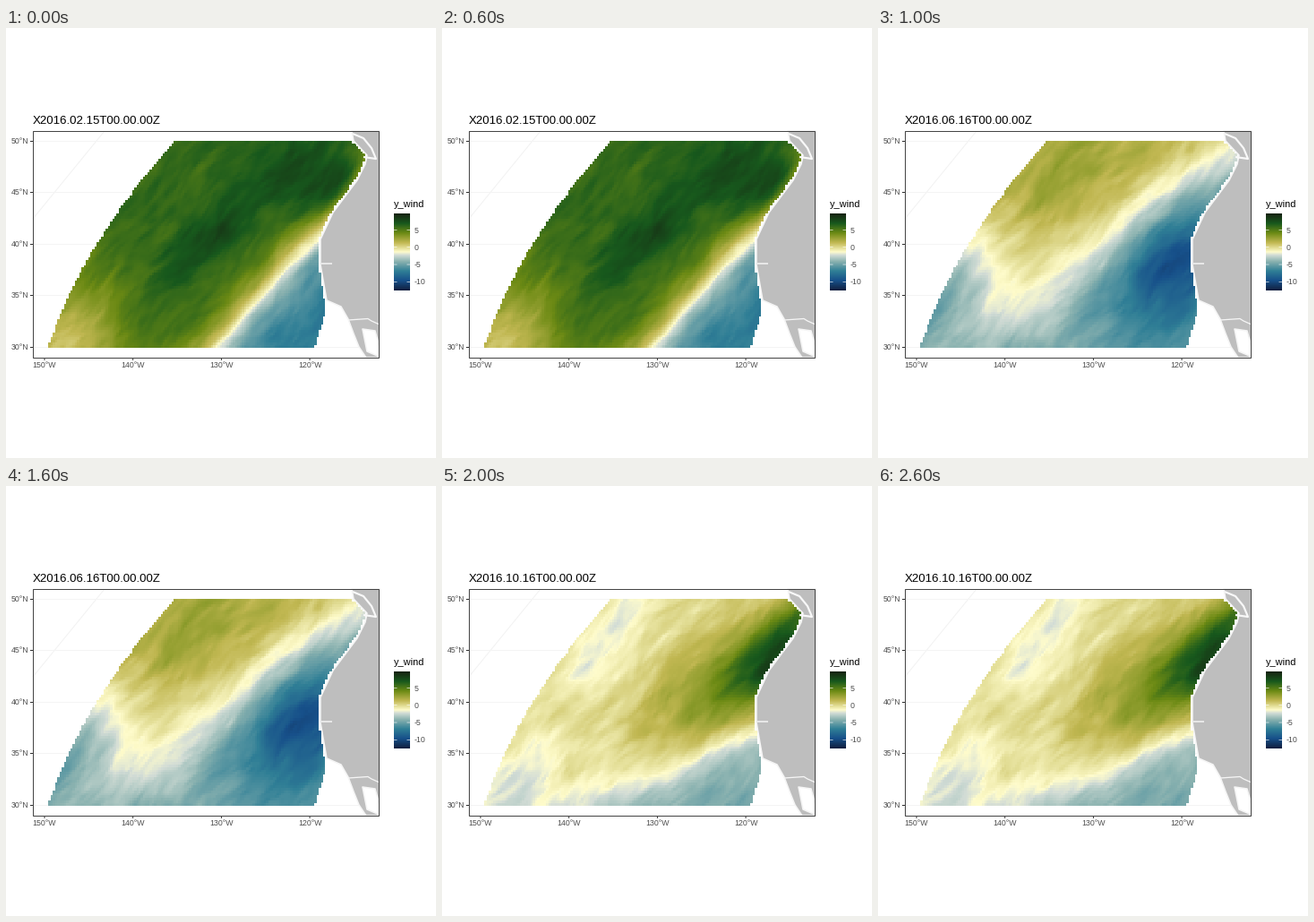
Animation of 480 by 480 pixels, one loop 3000 ms. Source, as a matplotlib script:

```python
import numpy as np
import matplotlib.pyplot as plt
from matplotlib.animation import FuncAnimation
from matplotlib.colors import LinearSegmentedColormap
from matplotlib.patches import Polygon, Rectangle

SIZE, DPI = 480, 96
PT = 72 / DPI
TOP, BOTTOM = 126, 357
WEST, EAST = 45, 403
ROWS, COLS = 80, 146
STREAK_ANGLE = np.radians(47)

plt.rcParams["font.family"] = "Liberation Sans"

DELTA = LinearSegmentedColormap.from_list("delta", [
    (0, "#112040"), (.125, "#17508a"), (.25, "#307f96"), (.375, "#8ab2b0"),
    (.46, "#d3ddd6"), (.5, "#fffccc"), (.625, "#c0b751"), (.75, "#6c8a14"),
    (.875, "#18591d"), (1, "#172313")], N=512)

# Each month: base level, one front (direction, offset, softness, drop)
# and swells (x, y, height, length, width) stretched along the streaks
MONTHS = [
    dict(title="X2016.02.15T00.00.00Z", base=.83,
         front=((.758, .652), 408, 13, .58),
         swells=[(220, 240, .08, 85, 28), (330, 155, .06, 80, 40),
                 (62, 350, -.2, 80, 75), (375, 185, .2, 50, 30)]),
    dict(title="X2016.06.16T00.00.00Z", base=.67,
         front=((.584, .812), 340, 22, .36),
         swells=[(330, 262, -.2, 70, 50), (55, 310, -.3, 110, 55),
                 (180, 320, .07, 50, 45), (190, 185, .05, 45, 18)]),
    dict(title="X2016.10.16T00.00.00Z", base=.55,
         front=((.4, .917), 395, 14, .2),
         swells=[(378, 185, .32, 85, 34), (300, 220, .13, 110, 50),
                 (180, 172, -.09, 65, 22), (85, 335, -.08, 50, 40)]),
]

# Coast from north to south
COAST = [(388, 126), (403, 142), (401, 152), (392, 170), (365, 206),
         (351, 236), (351, 264), (358, 304)]
PENINSULA = [(374, 311), (382, 325), (388, 341), (394, 356), (402, 368)]
GULF = [(398, 336), (412, 338), (417, 356), (417, 367), (403, 361)]


def along_across(x, y):
    c, s = np.cos(STREAK_ANGLE), np.sin(STREAK_ANGLE)
    return x * c - y * s, x * s + y * c


def wind_level(month, x, y):
    (nx, ny), offset, softness, drop = month["front"]
    side = (nx * x + ny * y - offset) / softness
    level = month["base"] - drop / (1 + np.exp(-side))
    for cx, cy, height, length, width in month["swells"]:
        a, b = along_across(x - cx, y - cy)
        level += height * np.exp(-(a / length) ** 2 - (b / width) ** 2)
    return level


def value_noise(rng, a, b):
    grid = rng.uniform(-1, 1, (128, 128))
    i, j = np.floor(a).astype(int), np.floor(b).astype(int)
    fa, fb = a - i, b - j
    fa, fb = fa * fa * (3 - 2 * fa), fb * fb * (3 - 2 * fb)

    def at(p, q):
        return grid[(i + p) % 128, (j + q) % 128]

    return ((at(0, 0) * (1 - fa) + at(1, 0) * fa) * (1 - fb)
            + (at(0, 1) * (1 - fa) + at(1, 1) * fa) * fb)


def streaks(rng, x, y):
    a, b = along_across(x, y)
    b = b + 4 * np.sin(a / 23)
    return sum(.024 * .75 ** k * value_noise(rng, a * 2 ** k / 46,
                                             b * 2 ** k / 15)
               for k in range(3))


def ocean_mask(x, y):
    v = (y - TOP) / (BOTTOM - TOP)
    west = 188 - 206 * v + 65 * v ** 2
    coast_x, coast_y = zip(*COAST)
    shore = np.interp(y, coast_y, coast_x) - 2.5
    offshore = 359 - (y - 312) / 3
    return (x >= west) & (x <= np.minimum(shore, offshore))


def wind_image(month, seed):
    x = WEST + (np.arange(COLS) + .5) * (EAST - WEST) / COLS
    y = TOP + (np.arange(ROWS) + .5) * (BOTTOM - TOP) / ROWS
    x, y = np.meshgrid(x, y)
    level = wind_level(month, x, y) + streaks(np.random.default_rng(seed), x, y)
    rgba = DELTA(np.clip(level, 0, 1))
    rgba[..., 3] = ocean_mask(x, y)
    return rgba


fig = plt.figure(figsize=(SIZE / DPI, SIZE / DPI), dpi=DPI, facecolor="white")
ax = fig.add_axes([0, 0, 1, 1])
ax.axis("off")


def line(points, color, width=1, z=1):
    ax.plot(*zip(*points), color=color, lw=width * PT, zorder=z,
            solid_capstyle="butt", snap=False)


def label(x, y, text, size=8.8, color="#4d4d4d", ha="left"):
    return ax.text(x, y, text, fontsize=size * PT, color=color, ha=ha,
                   va="baseline")


def shape(points, fill, z):
    ax.add_patch(Polygon(points, fc=fill, ec="#f5f5f5", lw=1.6 * PT,
                         joinstyle="round", zorder=z))


def picture(data, box, z=2):
    return ax.imshow(data, extent=box, aspect="auto",
                     interpolation="nearest", zorder=z)


# Graticule and axis labels
line([(30, 213), (110, 115)], "#f2f2f2")
for i in range(5):
    y = np.floor(126 + 57.5 * i) + .5
    line([(30, y), (417, y)], "#f4f4f4")
    line([(27, y), (30, y)], "#333333")
    label(25, y + 2.4, f"{50 - 5 * i}°N", ha="right")
for i in range(4):
    x = 43 + 98.7 * i
    line([(x, 368), (x, 371)], "#333333")
    label(x, 379.4, f"{150 - 10 * i}°W", ha="center")

# Land with its straits, gulf and border
shape([(386, 115), (417, 115), (417, 368)] + (COAST + PENINSULA)[::-1],
      "#bebebe", 3)
shape(GULF, "white", 4)
line([(387, 118), (399, 123), (408, 134), (413, 146), (399, 144)],
     "#f8f8f8", 2.2, 4)
line([(382, 326), (404, 324.5), (408, 327), (417, 331)], "#f5f5f5", 1.3, 4)
line([(352, 263), (364, 263)], "#f5f5f5", 1.5, 4)
ax.add_patch(Rectangle((30.5, 115.5), 386, 253, fill=False, ec="#444444",
                       lw=PT, snap=False, zorder=6))

# Colour bar
label(433, 200, "y_wind", 11, "black")
picture(DELTA(np.linspace(1, 0, 86))[:, None], (433, 451, 293, 207))
for i in range(4):
    y = 225.4 + 19.3 * i
    for x in (433, 447.5):
        line([(x, y), (x + 3.5, y)], "white", .6, 3)
    label(456, y + 3.2, str(5 - 5 * i))

images = [wind_image(month, seed) for seed, month in enumerate(MONTHS)]
wind = picture(images[0], (WEST, EAST, BOTTOM, TOP))
title = label(30, 107.3, MONTHS[0]["title"], 13.2, "black")
ax.set_xlim(0, SIZE)
ax.set_ylim(SIZE, 0)


def update(i):
    wind.set_data(images[i])
    title.set_text(MONTHS[i]["title"])
    return wind, title


anim = FuncAnimation(fig, update, frames=len(MONTHS), interval=1000,
                     repeat=True, repeat_delay=0)
plt.show()
```
